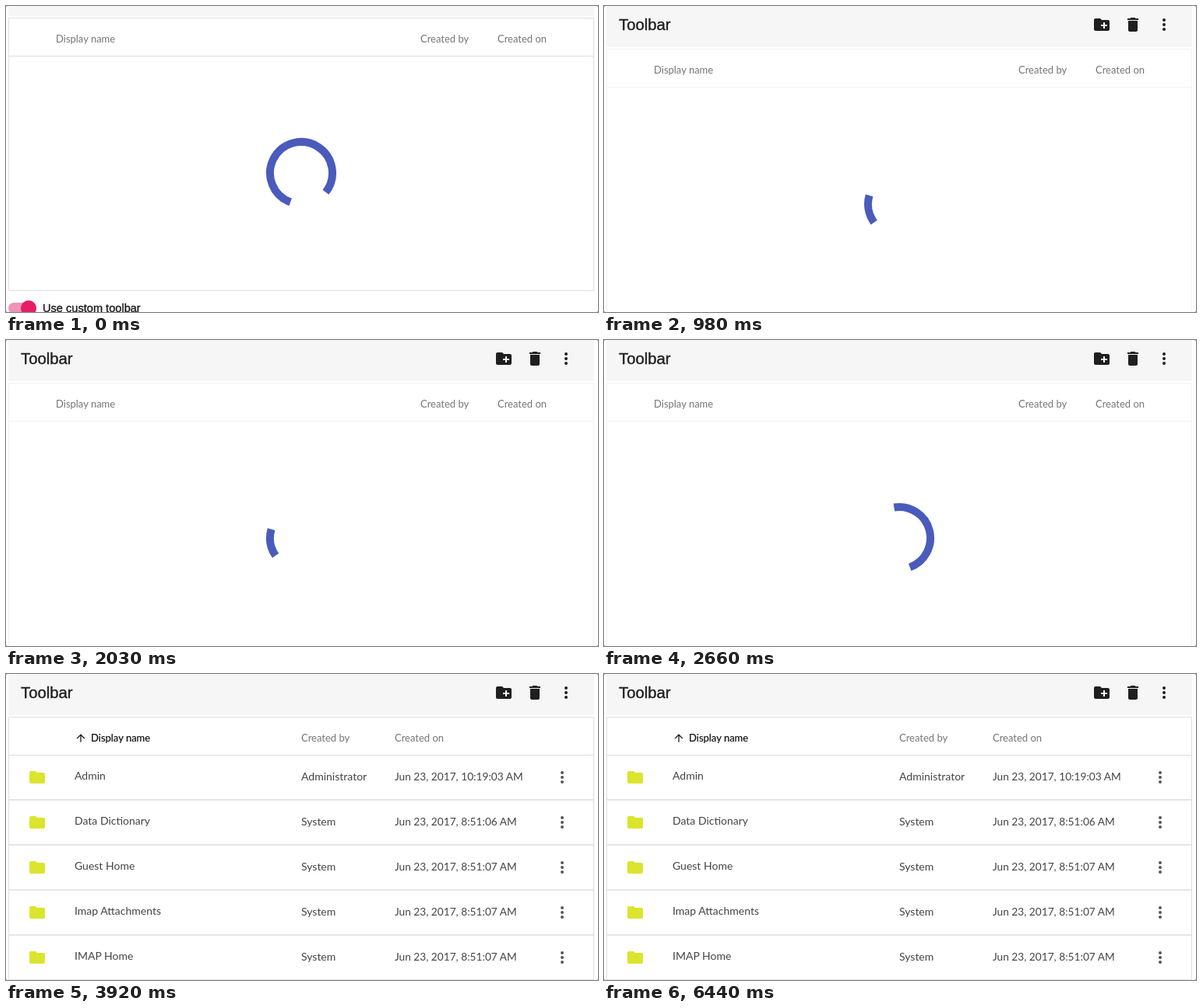
An HTML page that plays this animation: 760 by 394 pixels, repeating every 6510 ms.

```html
<!DOCTYPE html>
<html lang="en">
<head>
<meta charset="utf-8">
<title>Document list loading</title>
<style>
  html, body { margin: 0; width: 100%; height: 100%; overflow: hidden; background: #777; }
  svg { display: block; width: 760px; height: 394px; background: #fff; border-radius: 2px; }
  text { font: 14px Lato, "Open Sans", sans-serif; fill: #444; }
  .head text { font-size: 13px; fill: #757575; }
  .head .sorted { fill: #111; stroke: #111; stroke-width: .2px; }
  .date { font-size: 13.7px; }
  .ui { font: 20.3px "Liberation Sans", Arial, sans-serif; fill: #1c1c1c; stroke: #1c1c1c; stroke-width: .35px; }
  .label { font-size: 14.6px; }
  .frame { fill: none; stroke: #dedede; }
  .soft .frame { stroke: #f1f1f1; }
  .icon { fill: #1f1f1f; }
  .dots { fill: #555; }
  .folder { fill: #dbe52d; }
  #arc { fill: none; stroke: #4a5bbc; stroke-width: 10; }
</style>
</head>
<body>
<svg viewBox="0 0 760 394">
  <defs>
    <path id="dots" d="M-2-6a2 2 0 1 0 4 0a2 2 0 1 0-4 0zM-2 0a2 2 0 1 0 4 0a2 2 0 1 0-4 0zM-2 6a2 2 0 1 0 4 0a2 2 0 1 0-4 0z"/>
    <path id="folder" d="M10 4H4c-1.1 0-2 .9-2 2v12c0 1.1.9 2 2 2h16c1.1 0 2-.9 2-2V8c0-1.1-.9-2-2-2h-8l-2-2z"/>
  </defs>
  <g id="page">
    <rect x="3" width="752" height="53" fill="#f6f6f6"/>
    <text class="ui" x="19" y="31">Toolbar</text>
    <g class="icon">
      <path transform="translate(627 12)" d="M20 6h-8l-2-2H4c-1.1 0-2 .9-2 2v12c0 1.1.9 2 2 2h16c1.1 0 2-.9 2-2V8c0-1.1-.9-2-2-2zm-1 8h-3v3h-2v-3h-3v-2h3V9h2v3h3v2z"/>
      <path transform="translate(667 12)" d="M6 19c0 1.1.9 2 2 2h8c1.1 0 2-.9 2-2V7H6v12zM19 4h-3.5l-1-1h-5l-1 1H5v2h14V4z"/>
      <use href="#dots" x="719" y="24"/>
    </g>
    <path class="frame" d="M3.5 55.5h751V406.500H3.500zM3.500 104.500h751"/>

    <g id="loading">
      <g class="head">
        <text x="64" y="87">Display name</text>
        <text x="532" y="87">Created by</text>
        <text x="631" y="87">Created on</text>
      </g>
      <path id="arc"/>
    </g>

    <g id="table">
      <g class="head">
        <path class="icon" transform="translate(88 74.500) scale(.667)" d="M4 12l1.410 1.410L11 7.830V20h2V7.830l5.580 5.590L20 12l-8-8-8 8z"/>
        <text class="sorted" x="109" y="87">Display name</text>
        <text x="379" y="87">Created by</text>
        <text x="499" y="87">Created on</text>
      </g>
      <g id="rows"></g>
    </g>

    <rect x="3" y="422" width="36" height="14" rx="7" fill="#f193b7"/>
    <circle cx="29" cy="429" r="10" fill="#e61e66"/>
    <text class="ui label" x="47" y="434">Use custom toolbar</text>
  </g>
</svg>
<script>
  const LOOP = 6510, STEP = 70, TABLE_AT = 3710, SCROLL_END = 350;
  const HALF = 717, SWEEP = 667;           // one grow or shrink, with its short hold
  const MIN = 10.8, MAX = 288;             // arc length in degrees
  const $ = id => document.getElementById(id);

  const rows = [
    ['Admin', 'Administrator', '10:19:03'],
    ['Data Dictionary', 'System', '8:51:06'],
    ['Guest Home', 'System', '8:51:07'],
    ['Imap Attachments', 'System', '8:51:07'],
    ['IMAP Home', 'System', '8:51:07']
  ];
  $('rows').innerHTML = rows.map(([name, author, time], i) => `
    <g transform="translate(0 ${i * 58})">
      <use class="folder" href="#folder" x="28" y="121"/>
      <text x="88" y="136">${name}</text>
      <text x="379" y="137">${author}</text>
      <text class="date" x="499" y="137">Jun 23, 2017, ${time} AM</text>
      <use class="dots" href="#dots" x="714" y="133"/>
      <path class="frame" stroke-width="1.5" d="M3.5 162h751"/>
    </g>`).join('');

  const clamp = x => Math.min(1, Math.max(0, x));
  const smooth = x => x * x * (3 - 2 * x);
  const smoother = x => x * x * x * (10 + x * (6 * x - 15));

  function point(deg) {
    const a = deg * Math.PI / 180;
    return `${(379 + 40 * Math.sin(a)).toFixed(2)} ${(255 - 40 * Math.cos(a)).toFixed(2)}`;
  }

  function arcPath(t) {
    const real = t / 1.05;
    const clock = real + HALF - 23;
    const half = Math.floor(clock / HALF);
    const k = smoother(clamp((clock - half * HALF) / SWEEP));
    const base = 200.2 + real / 2887 * 360 + Math.floor(half / 2) * (MAX - MIN);
    const travel = (MAX - MIN) * k;
    const shrinking = half % 2 === 1;
    const tail = shrinking ? base + travel : base;
    const head = shrinking ? base + MAX : base + MIN + travel;
    return `M${point(tail)}A40 40 0 ${head - tail > 180 ? 1 : 0} 1 ${point(head)}`;
  }

  function draw(t) {
    const loaded = t >= TABLE_AT;
    const scroll = -40 * (1 - smooth(clamp(t / SCROLL_END)));
    $('page').setAttribute('transform', `translate(0 ${scroll.toFixed(2)})`);
    $('page').classList.toggle('soft', t > 0 && !loaded);
    $('loading').style.display = loaded ? 'none' : '';
    $('table').style.display = loaded ? '' : 'none';
    if (!loaded) $('arc').setAttribute('d', arcPath(t));
  }

  const start = performance.now();
  function tick() {
    const t = (performance.now() - start) % LOOP;
    draw(Math.floor(t / STEP) * STEP);
    requestAnimationFrame(tick);
  }
  tick();
</script>
</body>
</html>
```
